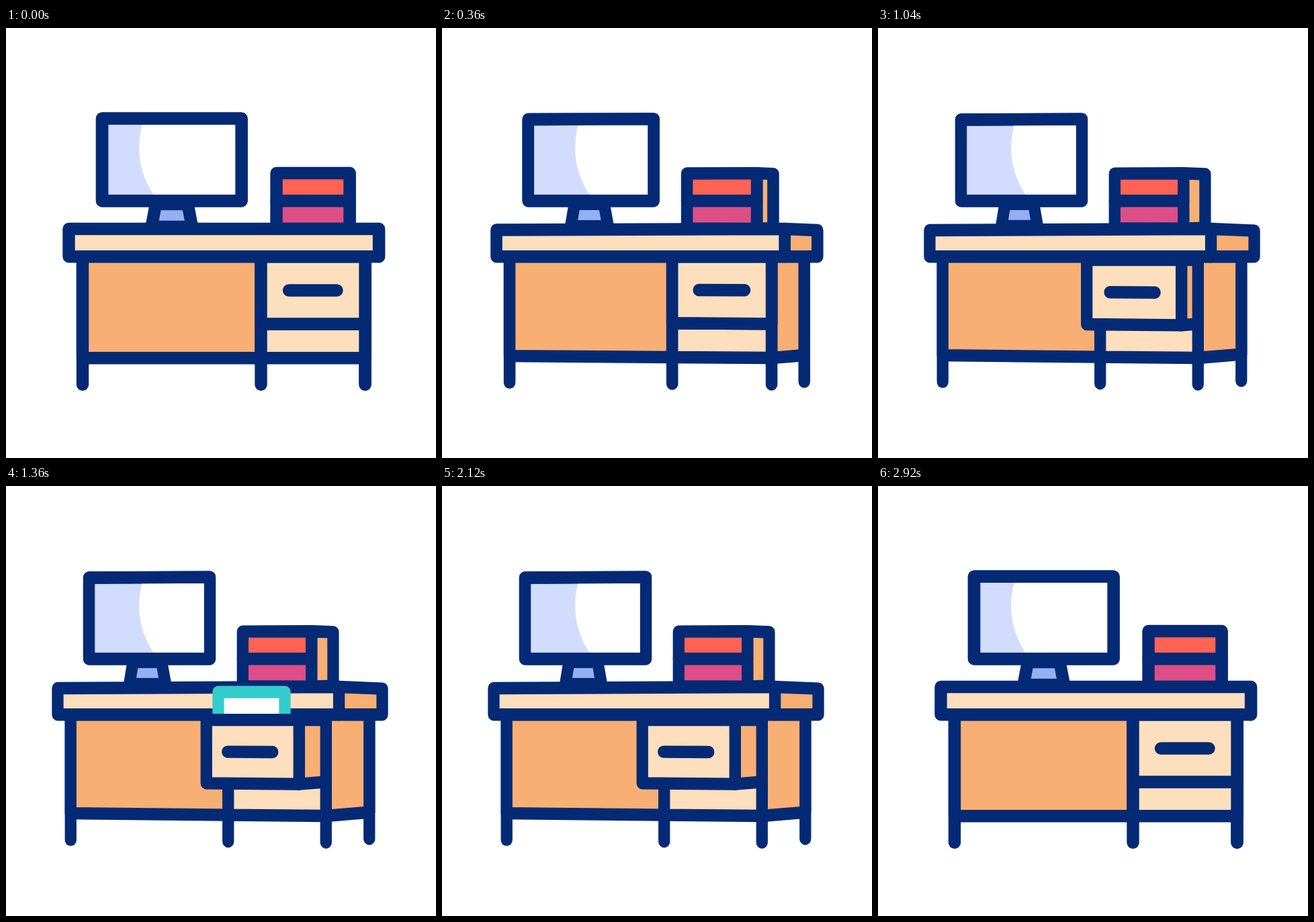
An HTML page with a canvas that plays this animation: 640x640 px, repeating every 3400 ms.

```html
<!DOCTYPE html>
<html>
<head>
<meta charset="utf-8">
<style>
html, body { margin: 0; height: 100%; overflow: hidden; background: #fff; }
canvas { display: block; }
</style>
</head>
<body>
<canvas id="stage" width="640" height="640"></canvas>
<script>
const ctx = document.getElementById('stage').getContext('2d');
const LOOP = 3400, DEPTH = 64.5;
const NAVY = '#042a75', CREAM = '#fddfbd', ORANGE = '#f7af74';
// How far the front moves left at a full turn, by x.
const LEAN = [[93, 16.5], [143, 19.5], [223, 34], [350, 47], [555, 59.5]];
let turn = 0, horizon = 340;

const mix = (a, b, k) => a + (b - a) * k;
const clamp = (x, low, high) => Math.min(high, Math.max(low, x));
const ease = (t, start, length) => {
  const x = clamp((t - start) / length, 0, 1);
  return x * x * (3 - 2 * x);
};

function lean(x) {
  const i = LEAN.findIndex(key => x <= key[0]);
  const [x0, y0] = LEAN[i - 1], [x1, y1] = LEAN[i];
  return mix(y0, y1, (x - x0) / (x1 - x0));
}

// Points further back (larger z, or further left) close in on the horizon.
function project([x, y, z = 0]) {
  const away = (555 - x) / 460 + z / 50;
  const shift = clamp((horizon - y) / 20, -4.2, 2);
  return [x + turn * (z - lean(x)), y + turn * away * shift];
}

function trace(points, closed) {
  ctx.beginPath();
  points.forEach(p => ctx.lineTo(...project(p)));
  if (closed) ctx.closePath();
}

// The pen gets narrower sideways as the desk turns.
function ink(color = NAVY) {
  ctx.save();
  ctx.scale(1 - 0.06 * turn, 1);
  ctx.strokeStyle = color;
  ctx.stroke();
  ctx.restore();
}

function fill(color) {
  ctx.fillStyle = color;
  ctx.fill();
}

function line(...points) {
  trace(points);
  ink();
}

function shape(color, ...points) {
  trace(points, true);
  fill(color);
  ink();
}

const front = (color, x0, y0, x1, y1, z = 0) =>
  shape(color, [x0, y0, z], [x1, y0, z], [x1, y1, z], [x0, y1, z]);
const side = (color, x, y0, y1, z) =>
  shape(color, [x, y0], [x, y0, z], [x, y1, z], [x, y1]);

function drawMonitor() {
  shape('#94b0f2', [223, 262], [270.5, 262], [277, 296], [216.5, 296]);
  front('#d2dcfd', 143, 134.7, 350.5, 257.3);
  ctx.save();
  ctx.clip();
  ctx.beginPath();
  ctx.arc(323, 178, 125, 0, 7);
  fill('#fff');
  ctx.restore();
  trace([[143, 134.7], [350.5, 134.7], [350.5, 257.3], [143, 257.3]], true);
  ink();
}

function drawBooks() {
  side(ORANGE, 511.5, 216, 299, DEPTH / 2);
  front('#ff6354', 402.5, 216, 511.5, 257.3);
  front('#dd4e86', 402.5, 257.3, 511.5, 299);
}

function drawDrawer(open) {
  const z = -40 * open, pull = open * turn;
  const drop = y => mix(y, 440, 0.075 * pull);
  const left = 379.5 + 8 * pull, right = 534.5;
  const top = drop(340.3), bottom = 440.5, grip = drop(390.5);
  shape(ORANGE, [right, top, z], [right, top], [right, bottom], [right, bottom, z]);
  front(CREAM, left, top, right, bottom, z);
  line([421, grip, z], [492.5, grip, z]);
}

function drawDesk(open) {
  for (const [x, z] of [[114, 0], [379.5, 0], [534.5, 0], [534.5, DEPTH]])
    line([x, 340, z], [x, 530.7, z]);
  side(ORANGE, 534.5, 340, 491.2, DEPTH);
  front(ORANGE, 114, 340, 379.5, 491.2);
  front(CREAM, 379.5, 340, 534.5, 440.5);
  front(CREAM, 379.5, 440.5, 534.5, 491.2);
  drawDrawer(open);
  side(ORANGE, 555, 299, 340.3, DEPTH);
  front(CREAM, 93.5, 299, 555, 340.3);
}

function drawPaper(open, rise) {
  if (rise <= 0) return;
  ctx.save();
  ctx.beginPath();
  ctx.rect(0, 0, 640, 339);
  ctx.clip();
  ctx.beginPath();
  ctx.rect(316 + 40 * (1 - open), 353 - 64 * rise, 99, 120);
  fill('#fff');
  ink('#33cccc');
  ctx.restore();
}

function frame(now) {
  const t = now % LOOP;
  turn = ease(t, 0, 533) - ease(t, 2380, 533);
  const open = ease(t, 733, 533);
  const rise = ease(t, 1055, 467) - ease(t, 1660, 460);

  ctx.clearRect(0, 0, 640, 640);
  ctx.lineWidth = 18.4;
  ctx.lineCap = ctx.lineJoin = 'round';
  horizon = 257.3;
  drawMonitor();
  drawBooks();
  horizon = 340;
  drawDesk(open);
  drawPaper(open, rise);
  requestAnimationFrame(frame);
}
frame(0);
</script>
</body>
</html>
```
